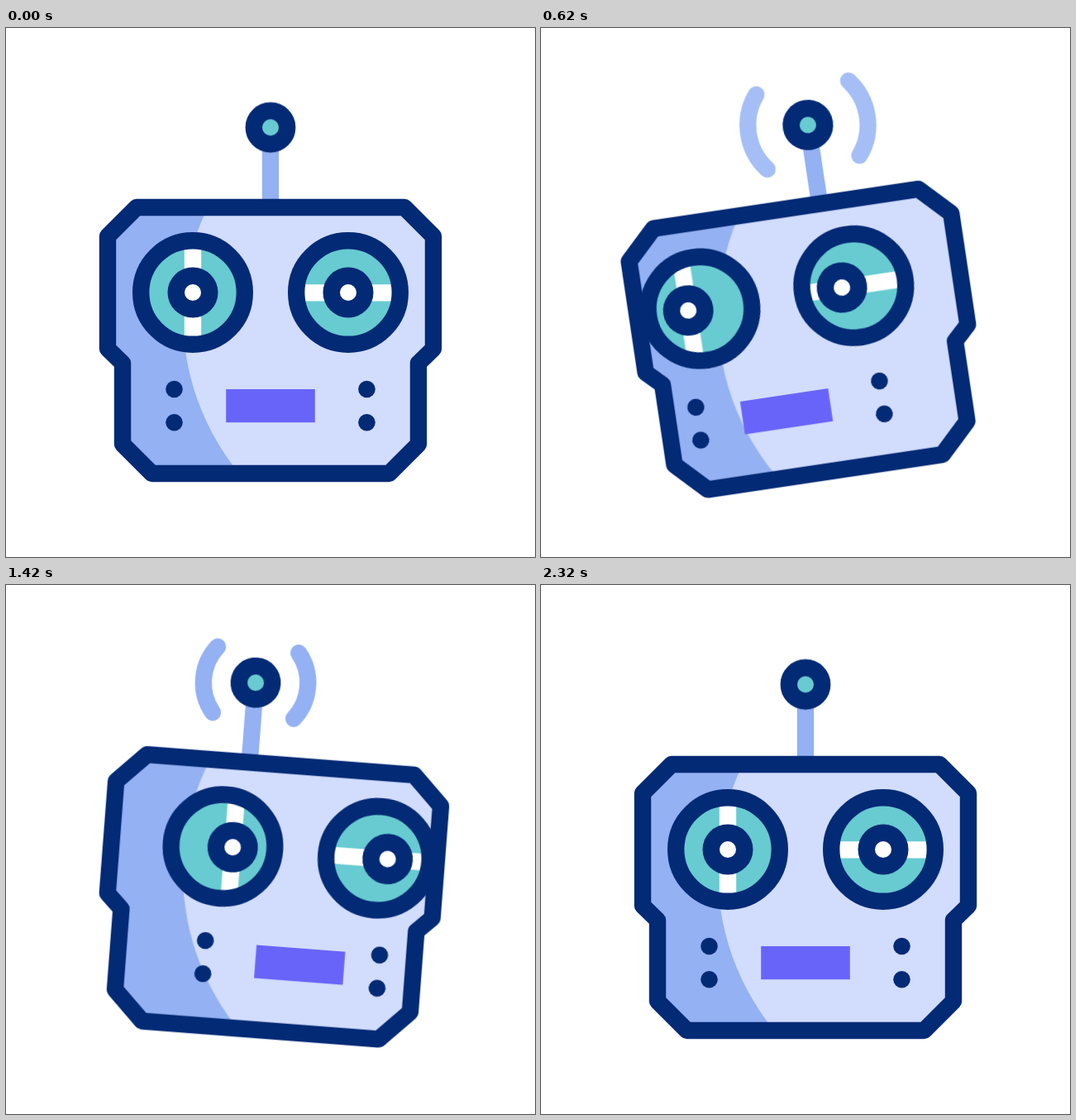
An HTML page for the animation above (3600 ms loop, 640 by 640 pixels).

```html
<!DOCTYPE html>
<html lang="en">
<head>
<meta charset="utf-8">
<title>Robot</title>
<style>
  html, body { margin: 0; width: 100%; height: 100%; overflow: hidden; background: #fff; }
  svg { display: block; width: 100%; height: 100%; }

  .tilt, .level, .slide, .part {
    animation: tilt 3600ms cubic-bezier(.83, 0, .17, 1) infinite;
  }
  .tilt, .level { transform-origin: 320px 378px; }
  .tilt { --a: rotate(-8.85deg); --b: rotate(4.95deg); --rest: rotate(0deg); }
  .level { --a: rotate(8.85deg); --b: rotate(-4.95deg); --rest: rotate(0deg); }
  .slide, .part { --rest: translate(0px, 0px); }
  .part { animation-name: shift; }

  .antenna { --a: translate(43.1px, .4px); --b: translate(-41.2px, 0px); }
  .eyes { --a: translate(-27.6px, 1.3px); --b: translate(34.4px, .9px); }
  .pupil { --a: translate(-15px, 0px); --b: translate(12.9px, 0px); }
  .mouth { --a: translate(-36.8px, 2.5px); --b: translate(44.6px, -.5px); }
  .left { --a: translate(-27.7px, 1.4px); --b: translate(44.8px, -1.1px); }
  .right { --a: translate(-36.7px, 2.8px); --b: translate(22.8px, .3px); }

  @keyframes tilt {
    0%, 64.444%, 100% { transform: var(--rest); }
    22.778% { transform: var(--a); }
    44.861% { transform: var(--b); }
  }
  /* facial features lead the head slightly */
  @keyframes shift {
    0%, 64.444%, 100% { transform: var(--rest); }
    22.64% { transform: var(--a); }
    44.75% { transform: var(--b); }
  }

  .wave {
    fill: none; stroke: #93b1f3; stroke-width: 20.3; stroke-linecap: round; opacity: 0;
    animation: grow 3600ms cubic-bezier(.3333, 0, .6667, 1) infinite, fade 3600ms linear infinite;
    animation-delay: calc(180ms + 430ms * var(--i));
  }
  @keyframes grow {
    0% { d: path("M-15.9 -12.9A20.5 20.5 0 0 0 -15.9 12.9M15.9 -12.9A20.5 20.5 0 0 1 15.9 12.9"); }
    19.444%, 100% { d: path("M-74.6 -60.4A96 96 0 0 0 -74.6 60.4M74.6 -60.4A96 96 0 0 1 74.6 60.4"); }
  }
  @keyframes fade {
    0%, 10.833% { opacity: 1; }
    19.444%, 100% { opacity: 0; }
  }

  .navy { fill: #032a75; }
  .teal { fill: #67cbd1; }
  .line { stroke: #032a75; stroke-width: 20.4; stroke-linejoin: round; }
</style>
</head>
<body>
<svg viewBox="0 0 640 640">
  <defs>
    <path id="shell" d="M158 217H482L517 252V388L499 405.5V503.5L463.5 539H176.5L141 503.5V405.5L123 388V252Z"/>
    <clipPath id="inside"><use href="#shell"/></clipPath>
    <clipPath id="iris"><circle r="54"/></clipPath>
    <g id="iris-disc"><circle class="teal" r="55"/></g>
    <g id="pupil">
      <circle class="navy" r="30.5"/>
      <circle r="10" fill="#fff"/>
    </g>
    <g id="dots" class="navy">
      <circle cy="437" r="10.3"/>
      <circle cy="477.2" r="10.3"/>
    </g>
  </defs>

  <g class="tilt">
    <g class="slide antenna">
      <path d="M320 130V217" stroke="#93b1f3" stroke-width="20.3"/>
      <g transform="translate(320 120.3)">
        <path class="wave" style="--i:0" d="M0 0"/>
        <path class="wave" style="--i:1" d="M0 0"/>
        <path class="wave" style="--i:2" d="M0 0"/>
        <path class="wave" style="--i:3" d="M0 0"/>
        <circle class="teal line" r="20.2"/>
      </g>
    </g>

    <use href="#shell" fill="#93b1f3"/>
    <g clip-path="url(#inside)">
      <circle class="level" cx="516" cy="348" r="302" fill="#d2dcfc"/>
    </g>
    <use href="#shell" class="line" fill="none"/>

    <g class="part eyes">
      <g transform="translate(226 320)">
        <use href="#iris-disc"/>
        <g clip-path="url(#iris)">
          <path class="part pupil" d="M0 -80V80" stroke="#fff" stroke-width="20.4"/>
        </g>
        <circle class="line" r="62.8" fill="none"/>
        <g class="part pupil"><use href="#pupil"/></g>
      </g>
      <g transform="translate(414 320)">
        <use href="#iris-disc"/>
        <g clip-path="url(#iris)">
          <path class="part pupil" d="M-80 .4H80" stroke="#fff" stroke-width="20.4"/>
        </g>
        <circle class="line" r="62.8" fill="none"/>
        <g class="part pupil"><use href="#pupil"/></g>
      </g>
    </g>

    <rect class="part mouth" x="266.2" y="437" width="107.6" height="40.2" fill="#6964f9"/>
    <g class="part left"><use href="#dots" x="203.5"/></g>
    <g class="part right"><use href="#dots" x="436.5"/></g>
  </g>
</svg>
</body>
</html>
```
